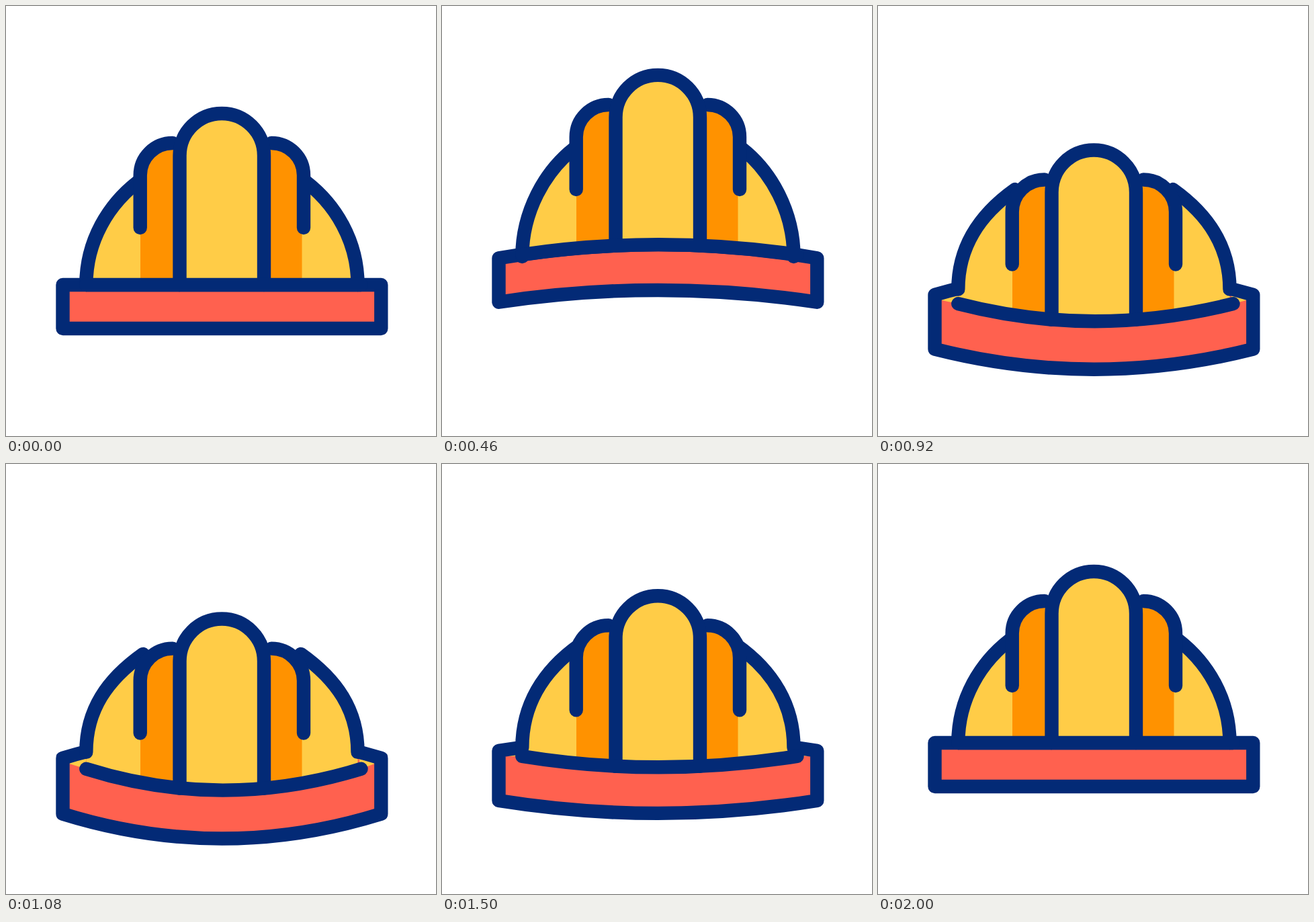
An HTML page for the animation above (3000 ms loop, 640 px wide and 640 px high).

```html
<!DOCTYPE html>
<html lang="en">
<head>
<meta charset="utf-8">
<title>Hard hat</title>
<style>
  html, body { margin: 0; width: 100%; height: 100%; overflow: hidden; background: #fff; }
  svg { display: block; width: 100%; height: 100%; }
  path { fill: none; stroke-linecap: round; stroke-linejoin: round; }
  .line { stroke: #032a76; stroke-width: 20.4; }
  .yellow { fill: #ffcc47; }
  .orange { fill: #ff9200; }
  .red { fill: #ff614f; }
</style>
</head>
<body>
<svg viewBox="0 0 640 640">
  <path id="brimFill" class="red"/>
  <path id="gaps" class="yellow"/>
  <path id="brim" class="line"/>
  <path id="domeFill" class="yellow"/>
  <path id="dome" class="line"/>
  <path id="ribFill" class="orange"/>
  <path id="ribs" class="line"/>
  <path id="crown" class="line yellow"/>
  <path id="rim" class="line"/>
</svg>
<script>
  const LOOP = 3000, FRAME = 1000 / 24;

  // Vertical offsets of each part from the resting helmet.
  const rest = { top: 0, rimMid: 0, rimEnd: 0, domeEnd: 0, domeTop: 0, brimTop: 0, arch: 0, brimLow: 0, brimMid: 0 };
  const up = { top: -61, rimMid: -64, rimEnd: -48, domeEnd: -45, domeTop: -53, brimTop: -42.5, arch: -21.5, brimLow: -42, brimMid: -61 };
  const down = { top: 71, rimMid: 71, rimEnd: 39, domeEnd: 14, domeTop: 27, brimTop: 23, arch: -36, brimLow: 41, brimMid: 78 };
  const keys = [[0, rest], [13.4, up], [24.8, down], [47.5, rest], [72, rest]];

  // cubic-bezier(.42, 0, .58, 1)
  function ease(x) {
    let low = 0, high = 1;
    for (let i = 0; i < 24; i++) {
      const s = (low + high) / 2, r = 1 - s;
      if (3 * r * r * s * .42 + 3 * r * s * s * .58 + s * s * s < x) low = s;
      else high = s;
    }
    return low * low * (3 - 2 * low);
  }

  function poseAt(frame) {
    const i = keys.findIndex(([end]) => end > frame);
    const [start, from] = keys[i - 1], [end, to] = keys[i];
    const k = ease((frame - start) / (end - start));
    return Object.fromEntries(Object.keys(rest).map(n => [n, from[n] + (to[n] - from[n]) * k]));
  }

  const setPath = (id, d) => document.getElementById(id).setAttribute('d', d);

  function draw(p) {
    const L = 84.5, R = 558.3, mid = 321.4;
    const corner = 415 + p.brimTop, low = 480 + p.brimLow;
    const brim = `M${L} ${corner}Q${mid} ${corner + 2 * p.arch} ${R} ${corner}V${low}` +
      `Q${mid} ${2 * (480 + p.brimMid) - low} ${L} ${low}Z`;
    setPath('brimFill', brim);
    setPath('brim', brim);

    const domeEnd = 415 + p.domeEnd, shoulder = 256 + p.domeTop;
    const c1 = 352 + p.domeEnd, c2 = 294 + p.domeTop;
    const rimEnd = 415 + p.rimEnd, rimMid = 415 + p.rimMid;
    const bend = `Q${mid} ${2 * rimMid - rimEnd}`;
    const leftArc = `M119.3 ${domeEnd}C119.3 ${c1} 150.5 ${c2} 204 ${shoulder}`;
    const rightArc = `438.8 ${shoulder}C492.3 ${c2} 523.5 ${c1} 523.5 ${domeEnd}`;
    setPath('dome', `${leftArc}M${rightArc}`);
    setPath('domeFill', `${leftArc}L${rightArc}V${rimEnd}${bend} 119.3 ${rimEnd}Z`);
    setPath('rim', `M119.3 ${rimEnd}${bend} 528.5 ${rimEnd}`);
    setPath('gaps', `M119 ${rimEnd}L94 ${corner + 8}L119 ${domeEnd}ZM528 ${rimEnd}L549 ${corner + 8}L524 ${domeEnd}Z`);

    const rimY = x => rimMid + (rimEnd - rimMid) * ((x - mid) / 204.6) ** 2;
    const y = 204 + p.top, inner = rimY(258.5), outer = rimY(200);
    const leftRib = `V${y + 48}A48 48 0 0 1 248 ${y}`;
    setPath('ribFill', `M200 ${outer}${leftRib}H258.5V${inner}Z` +
      `M384 ${inner}V${y}H395A48 48 0 0 1 440.5 ${y + 40}V${outer}Z`);
    setPath('ribs', `M199.7 ${y + 126}${leftRib}M395 ${y}A48 48 0 0 1 443 ${y + 48}V${y + 126}`);
    setPath('crown', `M258.5 ${inner}V${y + 18.7}A62.75 62.75 0 0 1 384 ${y + 18.7}V${inner}`);
  }

  const began = performance.now();
  function tick() {
    const time = (performance.now() - began) % LOOP;
    draw(poseAt(Math.min(71, Math.floor((time + 8) / FRAME))));
    requestAnimationFrame(tick);
  }
  tick();
</script>
</body>
</html>
```
